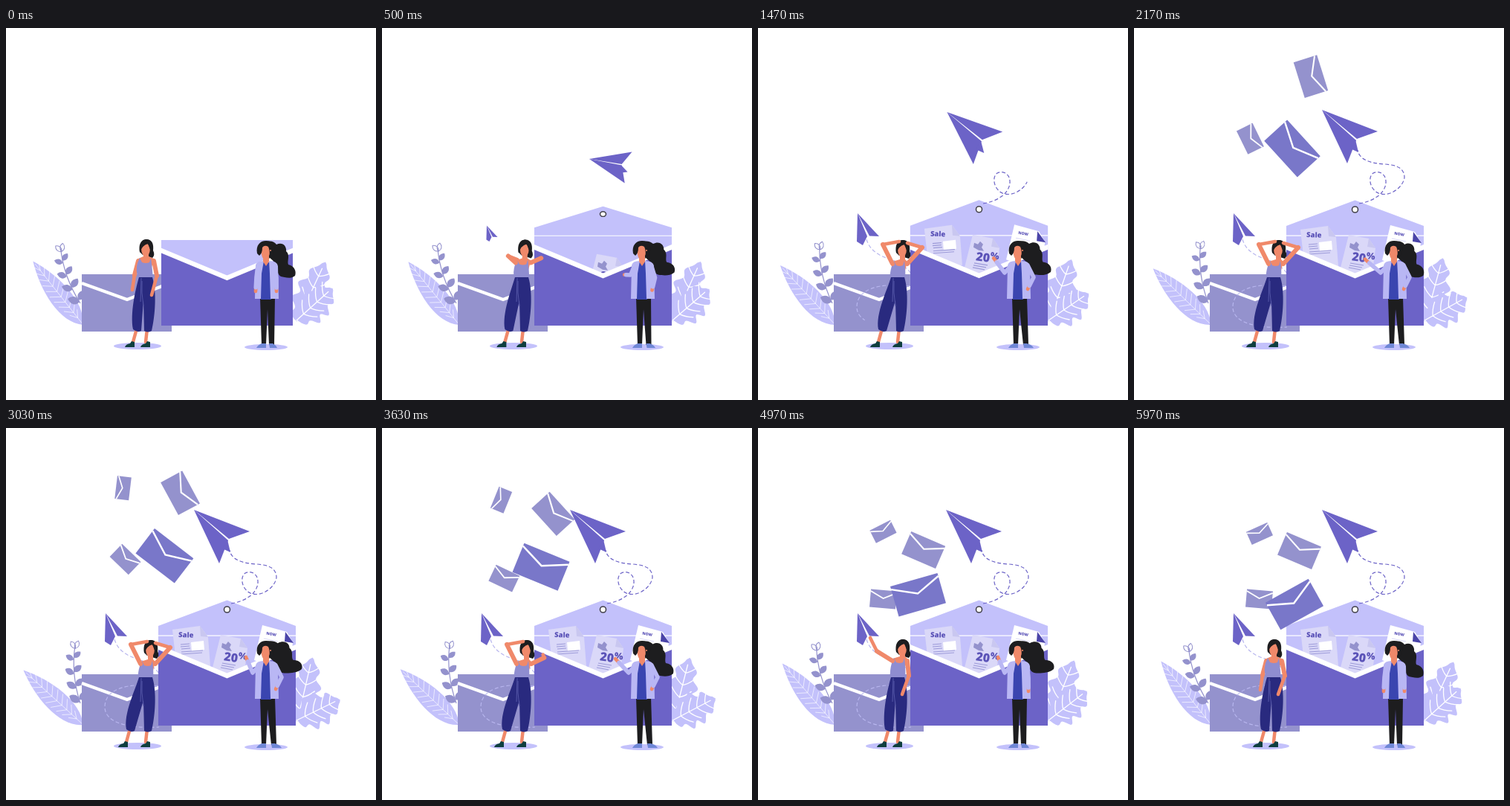
An HTML page that plays this animation: 498x500 px, repeating every 6010 ms.

```html
<!DOCTYPE html>
<html lang="en">
<head>
<meta charset="utf-8">
<title>Newsletter</title>
<style>
  html, body { margin: 0; width: 100%; height: 100%; overflow: hidden; background: #fff; }
  svg { display: block; width: 498px; height: 500px; }
  text { font-family: "Open Sans", "Noto Sans", sans-serif; font-weight: 800; fill: #5b53b8; }
  .lilac { fill: #c3c1fb; }
  .mid { fill: #9492cd; }
  .deep { fill: #6c63c7; }
  .skin { fill: #f0896a; }
  .ink { fill: #1d1d1f; }
  .paper { fill: #dad8f8; }
  .corner { fill: #c9c7f0; }
  .limb { fill: none; stroke-linecap: round; stroke-linejoin: round; }
  .vein { fill: none; stroke: #fff; stroke-linecap: round; }
  .lines { stroke: #9c9ad8; stroke-width: 1.2; }
  .fold { fill: none; stroke: #fff; }
  .dash { fill: none; stroke-width: 1.2; stroke-dasharray: 5 3; }
  .reveal { fill: none; stroke: #fff; stroke-width: 6; }
</style>
</head>
<body>
<svg viewBox="0 0 498 500">
  <defs>
    <path id="bigPath" d="M303 236C322 233 337 223 339 209C340 196 330 191 322 195C314 201 318 217 329 222C343 228 362 215 364 201C364 187 351 184 338 183C318 182 303 177 301 164"/>
    <path id="smallPath" d="M146 284C150 298 162 306 176 310C200 318 218 336 203 347C165 342 133 350 133 375C133 398 170 404 206 402"/>
    <mask id="bigMask" maskUnits="userSpaceOnUse" x="0" y="0" width="498" height="500"><use id="bigReveal" href="#bigPath" class="reveal"/></mask>
    <mask id="smallMask" maskUnits="userSpaceOnUse" x="0" y="0" width="498" height="500"><use id="smallReveal" href="#smallPath" class="reveal"/></mask>
    <clipPath id="bodyClip"><path d="M205 100H390V400H205Z"/></clipPath>
  </defs>

  <g id="leaf"></g>
  <g id="sprig"></g>
  <path class="mid" d="M102 331H223V408H102Z"/>
  <path class="fold" d="M102 343L163 365L223 342" stroke-width="4.2"/>
  <g mask="url(#smallMask)"><use href="#smallPath" class="dash" stroke="#b8b6ee"/></g>
  <g id="smallPlane" class="deep">
    <path d="M134 249L163 280L150 279.5Z"/>
    <path d="M134 249L147 280L141 292L133 287Z"/>
  </g>
  <g id="lobeUp"></g>
  <g id="lobeSide"></g>

  <g id="backPanel">
    <g id="flap">
      <path class="lilac" d="M205 280V266L297.5 231.5L390 266V280Z"/>
      <path d="M205 279.5H390" stroke="#fff" stroke-width="2"/>
      <circle cx="297.5" cy="244" r="4" fill="#fff" stroke="#45434d" stroke-width="1.6"/>
    </g>
    <path class="lilac" d="M205 279.8H390V345H205Z"/>
  </g>

  <g id="flyers"></g>
  <g id="bigPlane" class="deep">
    <path d="M0 0L75 29L47 39Z"/>
    <path d="M0 0L46 41L34 72Z"/>
    <path d="M45 40L49 57L38 52Z"/>
  </g>

  <g id="front">
    <g clip-path="url(#bodyClip)">
      <g id="docSale">
        <path class="paper" d="M224 271L261 266L272 281L275 320L230 325Z"/>
        <path class="corner" d="M261 266L262 280L272 281Z"/>
        <text x="232" y="281" font-size="9.5" transform="rotate(2 232 281)">Sale</text>
        <path d="M249 288L266 286L267 298L250 300Z" fill="#fff"/>
        <path class="lines" d="M235 291L247 290M235 294L247 293M236 297L248 296M236 301L265 299M236 304L264 302"/>
      </g>
      <g id="docOffer">
        <path class="paper" d="M289 278L316 283L325 296L320 335L276 330Z"/>
        <path class="corner" d="M316 283L314 294L325 296Z"/>
        <path class="mid" d="M290 295L291 289L296 291L299 287L303 291L301 295L304 300L297 299Z"/>
        <g transform="rotate(8 294 311)">
          <text x="293" y="312.5" font-size="16">20</text>
          <text x="312" y="307.5" font-size="12.5">%</text>
        </g>
        <path class="lines" d="M291 316L309 319M290 319L307 322M289 322L305 325"/>
      </g>
      <g id="docNow">
        <path d="M345 265L378 274L386 288L382 330L334 312Z" fill="#fff"/>
        <path d="M376 274L375 287L387 289Z" fill="#4a44a8"/>
        <text x="350" y="277.5" font-size="5.2" transform="rotate(10 350 277)">NOW</text>
        <path d="M347 283L366 287" stroke="#dad8f8" stroke-width="1.2"/>
      </g>
      <path class="deep" d="M205 297L297.5 335L390 297V400H205Z"/>
      <path class="fold" d="M200 292.5L297.5 333L395 292.5" stroke-width="6.4"/>
    </g>
  </g>

  <g mask="url(#bigMask)"><use href="#bigPath" class="dash" stroke="#6c63c7"/></g>

  <ellipse class="lilac" cx="177" cy="427.5" rx="32" ry="4.5"/>
  <ellipse class="lilac" cx="350" cy="429" rx="29" ry="4"/>
  <g id="leftWoman"></g>
  <g id="rightWoman"></g>
</svg>
<script>
const LOOP = 6010;
const el = id => document.getElementById(id);
const place = (id, value) => el(id).setAttribute('transform', value);
const posed = ([x, y, angle, size]) => `translate(${x} ${y}) rotate(${angle}) scale(${size})`;

const clamp = u => Math.max(0, Math.min(1, u));
const ease = (t, from, to) => {
  const u = clamp((t - from) / (to - from));
  return u * u * (3 - 2 * u);
};
const easeOut = (t, from, to) => 1 - (1 - clamp((t - from) / (to - from))) ** 2;
const overshoot = (t, from, to) => {
  const v = clamp((t - from) / (to - from)) - 1;
  return 1 + 2.2 * v ** 3 + 1.2 * v ** 2;
};
const mix = (a, b, k) => a.map((v, i) => v + (b[i] - v) * k);
const MOVE = 550;
const blend = (t, first, ...steps) =>
  steps.reduce((pose, [at, next]) => mix(pose, next, ease(t, at, at + MOVE)), first);

// Plants: each grows upwards from its own origin.
function buildLeaf() {
  let veins = 'M0 0L0 -104';
  for (let y = 12; y < 96; y += 9) {
    const w = 12 * Math.sin(Math.PI * (y / 109) ** 0.8);
    veins += `M${-w} ${-y - 9}L0 ${-y}L${w} ${-y - 9}`;
  }
  el('leaf').innerHTML = `<path class="lilac" d="M0 0C-24 -22 -17 -72 0 -109C16 -72 21 -24 0 0Z"/>
    <path class="vein" stroke-width=".6" d="${veins}"/>`;
}

function buildSprig() {
  const bend = y => -5 * Math.sin(Math.PI * y / 80);
  const blade = (y, side, size) => `<path class="mid" d="M0 0C-8 -5 -5 -12 0 -16C6 -12 7 -5 0 0Z"
    transform="translate(${bend(y)} ${-y}) rotate(${side * 55}) scale(${size})"/>`;
  let out = '<path d="M0 0Q-9 -40 0 -78" fill="none" stroke="#9492cd" stroke-width="1.2"/>';
  for (let i = 0; i < 4; i++) {
    const y = 2 + 19 * i, size = 1.02 - 0.09 * i;
    out += blade(y, -1, size) + blade(y + 3, 1, size);
  }
  for (const side of [-1, 1]) {
    out += `<path d="M0 0C-4 -3 -4 -8 0 -11C4 -8 4 -3 0 0Z" fill="none" stroke="#9492cd"
      transform="translate(0 -74) rotate(${side * 28})"/>`;
  }
  el('sprig').innerHTML = out;
}

function buildLobed(id, length, width) {
  const half = u => width * Math.sin(Math.PI * u ** 0.85) ** 0.6 * (1 + 0.24 * Math.sin(u * 25));
  const steps = 40, left = [], right = [];
  for (let i = 0; i <= steps; i++) {
    const u = i / steps, w = half(Math.min(u, 0.999));
    left.push(`${-w} ${-u * length}`);
    right.unshift(`${w} ${-u * length - 1}`);
  }
  let veins = `M0 0L0 ${-length * 0.9}`;
  for (let u = 0.2; u < 0.8; u += 0.19) {
    const y = -u * length, w = width * 0.75;
    veins += `M${-w} ${y - 11}Q${-w / 2} ${y - 3} 0 ${y}Q${w / 2} ${y - 3} ${w} ${y - 11}`;
  }
  el(id).innerHTML = `<path class="lilac" d="M${left.concat(right).join('L')}Z"/>
    <path class="vein" stroke-width="1.3" d="${veins}"/>`;
}

// Envelopes shoot out of the mouth to a peak, then drift down. Poses are x, y, angle, scale.
const mouth = [285, 320, 110, .2];
const flyers = [
  { w: 31, h: 19, fill: '#9492cd', peak: [157, 78, -86, 1], rest: [169, 142, -24, 1], fall: [2700, 5300] },
  { w: 50, h: 33, fill: '#9492cd', peak: [238, 65, 72.6, 1], rest: [222.5, 165, 23, 1], fall: [2100, 5150] },
  { w: 35, h: 24, fill: '#9492cd', peak: [156, 146, 66, 1], rest: [168.5, 230, 5, 1], fall: [1850, 4750] },
  { w: 66, h: 42, fill: '#7977c9', peak: [213, 162, 47.5, 1], rest: [216, 237, -29, 1], fall: [2170, 5970] }
];

function buildFlyers() {
  el('flyers').innerHTML = flyers.map(({ w, h, fill }, i) => {
    const y = -h * 0.4;
    return `<g id="flyer${i}"><path fill="${fill}" d="M${-w / 2} ${-h / 2}h${w}v${h}h${-w}Z"/>
      <path class="fold" d="M${-w / 2} ${y}L0 ${-h * 0.04}L${w / 2} ${y}" stroke-width="${1 + h / 30}"/></g>`;
  }).join('');
}

function drawFlyers(t) {
  flyers.forEach(({ peak, rest, fall }, i) => {
    const launch = Math.max(1800, fall[0] - 370);
    const path = mix(peak, rest, ease(t, ...fall));
    place('flyer' + i, posed(mix(mouth, path, easeOut(t, launch, launch + 370))));
    el('flyer' + i).style.display = t < launch ? 'none' : '';
  });
}

function drawPlane(t) {
  const hover = mix([290, 335, -70, .1], [278, 162, -27, .78], easeOut(t, 200, 620));
  place('bigPlane', posed(mix(hover, [253, 110, 0, 1], ease(t, 700, 1600))));
  el('bigPlane').style.display = t < 200 ? 'none' : '';
}

const limb = (points, width, color = '#f0896a') =>
  `<polyline class="limb" points="${points.join(' ')}" stroke="${color}" stroke-width="${width}"/>`;

function drawLeftWoman(t) {
  const lean = ease(t, 180, 730) - ease(t, 5200, 5750);
  const spread = ease(t, 180, 730) - ease(t, 4330, 4880);
  const hx = 189 + 6 * lean, hy = 296 + spread;
  const lx = 178 + 3 * lean, rx = 199 + 2 * lean, sy = 312 + 4 * spread;
  const foot = 167 - 9 * spread;
  // Arm poses: elbow, hand.
  const leftArm = blend(t, [173, 332, 170, 352], [180, [168, 291, 190, 287]], [4330, [160, 300, 151, 282]], [5200, [173, 332, 170, 352]]);
  const rightArm = blend(t, [203, 333, 196, 359], [180, [221, 295, 201, 289]], [3400, [214, 331, 242, 330]], [4330, [203, 333, 194, 358]]);
  const arm = (x, [ex, ey, ...hand]) => limb([x, sy + 1, ex, ey, ...hand], 4.6) + limb([x, sy + 1, ex, ey], 6);
  const shoe = x => `<path fill="#0f3f3f" d="M${x - 7} 429Q${x - 6} 425 ${x} 424L${x + 2} 421L${x + 6} 422V429Z"/>`;
  el('leftWoman').innerHTML =
    (t < 180 || t > 5500 ? arm(lx, leftArm) : '') +
    limb([foot + 9, 404, foot + 4, 422], 4.5) + limb([190, 404, 188, 422], 4.5) + shoe(foot) + shoe(188) +
    `<path class="ink" d="M${hx - 9} ${hy + 5}C${hx - 11} ${hy - 8} ${hx - 5} ${hy - 12} ${hx} ${hy - 12}C${hx + 8} ${hy - 12} ${hx + 10} ${hy - 5} ${hx + 9} ${hy + 3}Q${hx + 12} ${hy + 9} ${hx + 8} ${hy + 13}L${hx - 5} ${hy + 9}Z"/>
    <path class="skin" d="M${lx} ${sy - 2}L${hx - 4} ${sy - 5}V${hy + 6}H${hx + 3}V${sy - 5}L${rx} ${sy - 2}L${rx - 3} ${sy + 10}H${lx + 3}Z"/>
    <path fill="#8f8dd0" d="M${lx - 1} ${sy + 4}L${lx + 2} ${sy - 3}L${lx + 5} ${sy + 3}Q${(lx + rx) / 2} ${sy + 5} ${rx - 6} ${sy + 3}L${rx - 4} ${sy - 3}Q${rx - 2} ${sy + 12} 198 337H178Q${lx - 4} ${sy + 14} ${lx - 1} ${sy + 4}Z"/>
    <path fill="#292a7f" d="M179 335H197C203 354 201 386 196 407Q191 410 186 407L185 366L${foot + 15} 407Q${foot + 10} 410 ${foot + 4} 405C${foot} 384 174 352 179 335Z"/>
    <path d="M182 336L181 368M183 340Q182 355 185 374" fill="none" stroke="#5557a8" stroke-width="1"/>
    <ellipse class="skin" cx="${hx - 1}" cy="${hy + 2}" rx="5.8" ry="8.8"/>
    <path class="ink" d="M${hx - 9} ${hy + 6}Q${hx - 10} ${hy - 11} ${hx} ${hy - 12}Q${hx + 10} ${hy - 10} ${hx + 8} ${hy + 9}Q${hx + 5} ${hy + 2} ${hx + 2} ${hy - 6}Q${hx - 6} ${hy - 4} ${hx - 9} ${hy + 6}Z"/>` +
    (t < 180 || t > 5500 ? '' : arm(lx, leftArm)) + arm(rx, rightArm);
}

function drawRightWoman(t, k) {
  const raise = ease(t, 200, 800) - ease(t, 5100, 5750);
  const hip = ease(t, 200, 800) - ease(t, 4330, 4900);
  const hand = mix([310, 311], [323, 308], k);
  const left = mix([339, 319, 337, 335, 336, 354], [341, 319, 332, 329, ...hand], raise);
  const right = mix([362, 319, 364, 336, 364, 354], [363, 319, 371, 335, 363, 351], hip);
  const arm = points => {
    const cuff = mix(points.slice(2, 4), points.slice(4), 0.72);
    return limb([...cuff, ...points.slice(4)], 4.6) + limb([...points.slice(0, 4), ...cuff], 5.6, '#b9b7f4');
  };
  const step = 6 * hip;
  const tail = (x, y, swing) => `${x + 9 * swing * k} ${y - 9 * swing * k}`;
  el('rightWoman').innerHTML =
    `<path class="ink" d="M346 291C351 284 361 286 ${tail(364, 291, .2)}C${tail(372, 287, .3)} ${tail(378, 293, .4)} ${tail(377, 300, .5)}C${tail(383, 305, .5)} ${tail(378, 313, .6)} ${tail(380, 318, .7)}C${tail(389, 320, .9)} ${tail(391, 328, 1)} ${tail(389, 333, 1)}C${tail(383, 338, .9)} ${tail(375, 335, .6)} ${tail(370, 334, .5)}C${tail(364, 331, .2)} 366 322 362 315L354 308Z"/>
    <path class="ink" d="M342 362H362L${361 + step / 2} 426H${354 + step / 2}L352 378L350 426H344Z"/>
    <path fill="#6f87d6" d="M337 430Q339 426 344 424H350V430ZM${365 + step} 430Q${363 + step} 426 ${359 + step / 2} 424H${354 + step / 2}L${355 + step / 2} 430Z"/>
    <path fill="#3a45b0" d="M343 315H357V365H343Z"/>
    <path fill="#b9b7f4" d="M347 313Q337 313 336 319L335 364H343L344 330ZM354 313Q365 313 366 320L367 364H356L355 330Z"/>
    <path class="skin" d="M346 305H354V314L350 320L346 314Z"/>
    <path class="skin" d="M344 292Q349 288 355 293V304Q352 312 347 311Q342 306 344 292Z"/>
    <path class="ink" d="M338 303C336 292 342 286 350 286C359 286 364 293 360 304L354 310Q356 300 353 294Q348 291 345 295Q345 303 341 306Z"/>
    <circle cx="356" cy="299" r="1" class="skin"/>` + arm(right) + arm(left);
}

function reveal(id, path, shown) {
  const length = el(path).getTotalLength();
  el(id).style.strokeDasharray = `${length} ${length * 2}`;
  el(id).style.strokeDashoffset = (length + 1) * (1 - shown);
}

const docStarts = { docSale: 600, docOffer: 300, docNow: 560 };

function render(t) {
  const turn = 2 * Math.PI * t / LOOP;
  const slow = Math.cos(turn);
  const beat = Math.cos(3 * turn);

  place('leaf', `translate(104 399) rotate(${-43 + 4.65 * slow})`);
  place('sprig', `translate(100 370) rotate(${-12.5 - 7.3 * slow})`);
  place('lobeUp', `translate(392 395) rotate(${19 + 6 * slow})`);
  place('lobeSide', `translate(391 393) rotate(${56 - 8 * slow})`);

  const swell = 1 - 0.043 * beat * (1 - ease(t, 930, 1900));
  const body = `translate(297.5 400) scale(${swell}) translate(-297.5 -400)`;
  place('backPanel', body);
  place('front', body);
  place('flap', `translate(0 280) scale(1 ${ease(t, 80, 650)}) translate(0 -280)`);
  for (const [id, at] of Object.entries(docStarts)) {
    place(id, `translate(0 ${72 * (1 - overshoot(t, at, at + 1000))})`);
  }

  drawPlane(t);
  drawFlyers(t);
  place('smallPlane', `translate(148 282) scale(${ease(t, 250, 750)}) translate(-148 -282)`);
  reveal('smallReveal', 'smallPath', ease(t, 550, 1900));
  reveal('bigReveal', 'bigPath', ease(t, 1000, 1800));

  drawLeftWoman(t);
  drawRightWoman(t, (1 - beat) / 2);
}

buildLeaf();
buildSprig();
buildLobed('lobeUp', 88, 18);
buildLobed('lobeSide', 64, 20);
buildFlyers();

const start = performance.now();
function frame() {
  render((performance.now() - start) % LOOP);
  requestAnimationFrame(frame);
}
frame();
</script>
</body>
</html>
```
